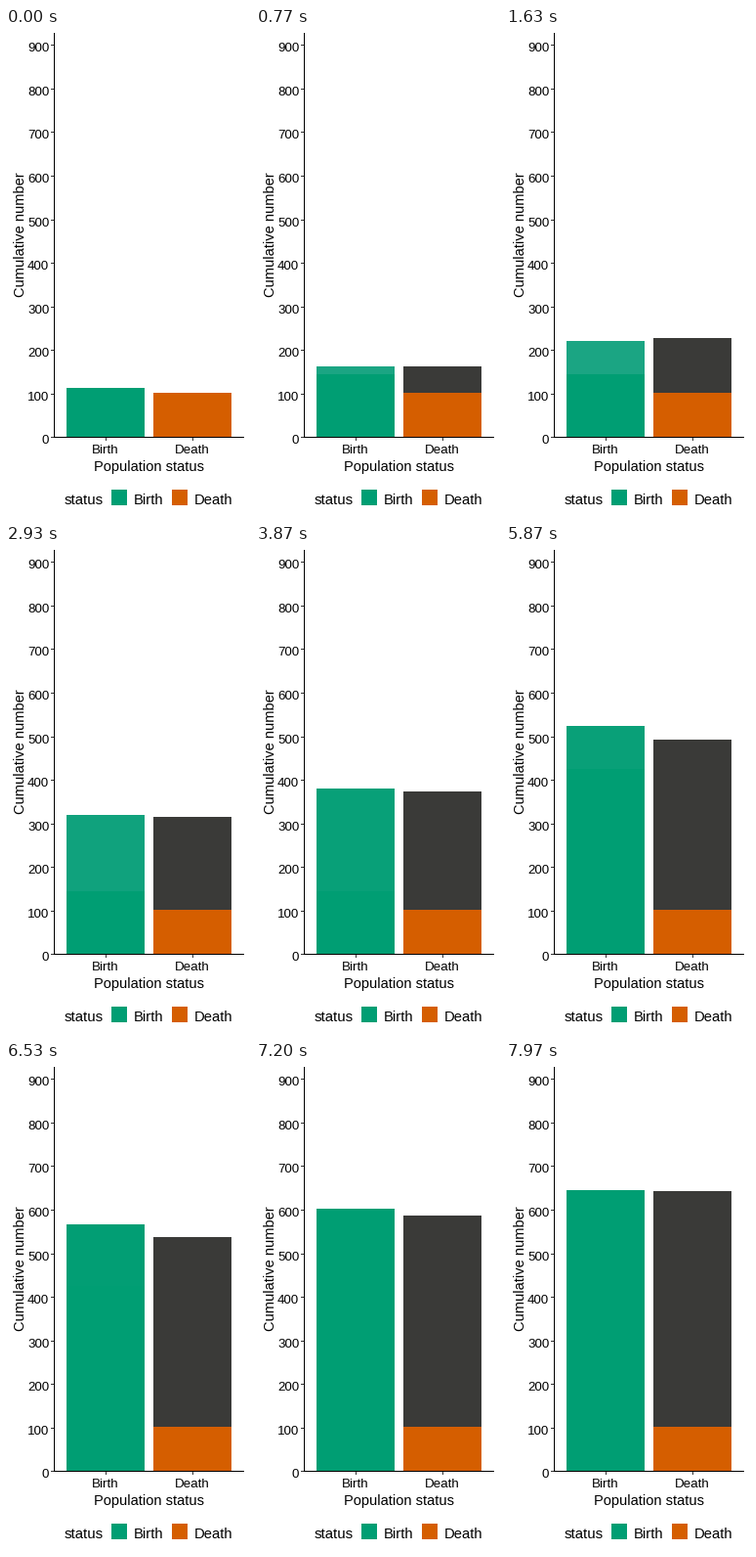
These frames come from a looping animation (250 by 500 pixels, 8 s). A matplotlib script:

```python
import matplotlib.pyplot as plt
import numpy as np
from matplotlib.animation import FuncAnimation
from matplotlib.patches import Rectangle

W, H, DPI = 250, 500, 100
INTERVAL, FRAMES = 20, 400
STEP = 100 / 3  # ms between picture changes

GREEN = np.array([0, 158, 115]) / 255
PALE = np.array([27, 165, 131]) / 255
ORANGE = "#d55e00"
DARK = "#3a3a38"
BASE = 418

# Bar tops in pixels over time in ms
TIMES = [0, 833, 1633, 2500, 2933, 3333, 4167, 4833, 5000, 5867, 6667, 7200, 7500, 7967]
BIRTH = [368, 344, 320, 291, 276, 264, 241, 222, 216, 185, 162, 150, 143, 131]
DEATH = [373, 344, 317, 291, 278, 267, 244, 226, 221, 199, 175, 157, 146, 132]

plt.rcParams["font.family"] = "Liberation Sans"
fig = plt.figure(figsize=(W / DPI, H / DPI), dpi=DPI, facecolor="white")
ax = fig.add_axes([0, 0, 1, 1])
ax.set_xlim(0, W)
ax.set_ylim(H, 0)
ax.axis("off")


def box(x, y, w, h, color, z=1):
    patch = Rectangle((x, y), w, h, facecolor=color, linewidth=0,
                      antialiased=False, zorder=z)
    return ax.add_patch(patch)


def label(x, y, text, px, ha="center", rotation=0):
    ax.text(x, y, text, fontsize=px * 72 / DPI, ha=ha, va="baseline",
            rotation=rotation, rotation_mode="anchor", color="black")


def set_span(patch, top, bottom):
    patch.set_y(top)
    patch.set_height(max(bottom - top, 0))


# Axes
box(49, 5, 1, 414, "black", 5)
box(49, BASE, 195, 1, "black", 5)
for n in range(10):
    y = round(418.3 - 44.55 * n)
    box(46, y, 3, 1, "#333333", 5)
    label(44.3, y + 7, str(100 * n), 13.33, "right")
for x, name in ((102, "Birth"), (191, "Death")):
    box(x, BASE + 1, 1, 3, "#333333", 5)
    label(x - 0.3, 435, name, 13.33)
label(146, 453, "Population status", 14.67)
label(19, 211.5, "Cumulative number", 14.67, rotation=90)

# Legend
label(59.7, 487, "status", 15, "left")
for x, name, color in ((108, "Birth", GREEN), (170, "Death", ORANGE)):
    box(x, 472, 16, 16, color)
    label(x + 23.2, 487, name, 14.8, "left")

# Bars
birth = box(62, BASE, 80, 0, GREEN)
pale = box(62, BASE, 80, 0, PALE, 2)
edge = box(62, BASE, 80, 1, DARK, 3)
box(151, 373, 80, BASE - 373, ORANGE)
death = box(151, 373, 80, 0, DARK, 2)


def update(i):
    t = round(i * INTERVAL / STEP) * STEP
    b = round(np.interp(t, TIMES, BIRTH))
    d = round(np.interp(t, TIMES, DEATH))
    set_span(birth, b, BASE)
    set_span(death, d, 373)

    # Newer part of the birth bar starts pale and settles into full green
    if t < 5000:
        start, tint = 354, np.interp(t, [1633, 2933, 4700], [1, 0.6, 0])
    else:
        start, tint = 229, np.interp(t, [5000, 5867, 6700], [0.5, 0.32, 0])
    set_span(pale, b, start)
    pale.set_facecolor(GREEN + (PALE - GREEN) * tint)

    edge.set_y(b)
    edge.set_visible(4500 < t < 5000)
    return birth, pale, edge, death


anim = FuncAnimation(fig, update, frames=FRAMES, interval=INTERVAL,
                     repeat=True, repeat_delay=0, blit=False)
plt.show()
```
